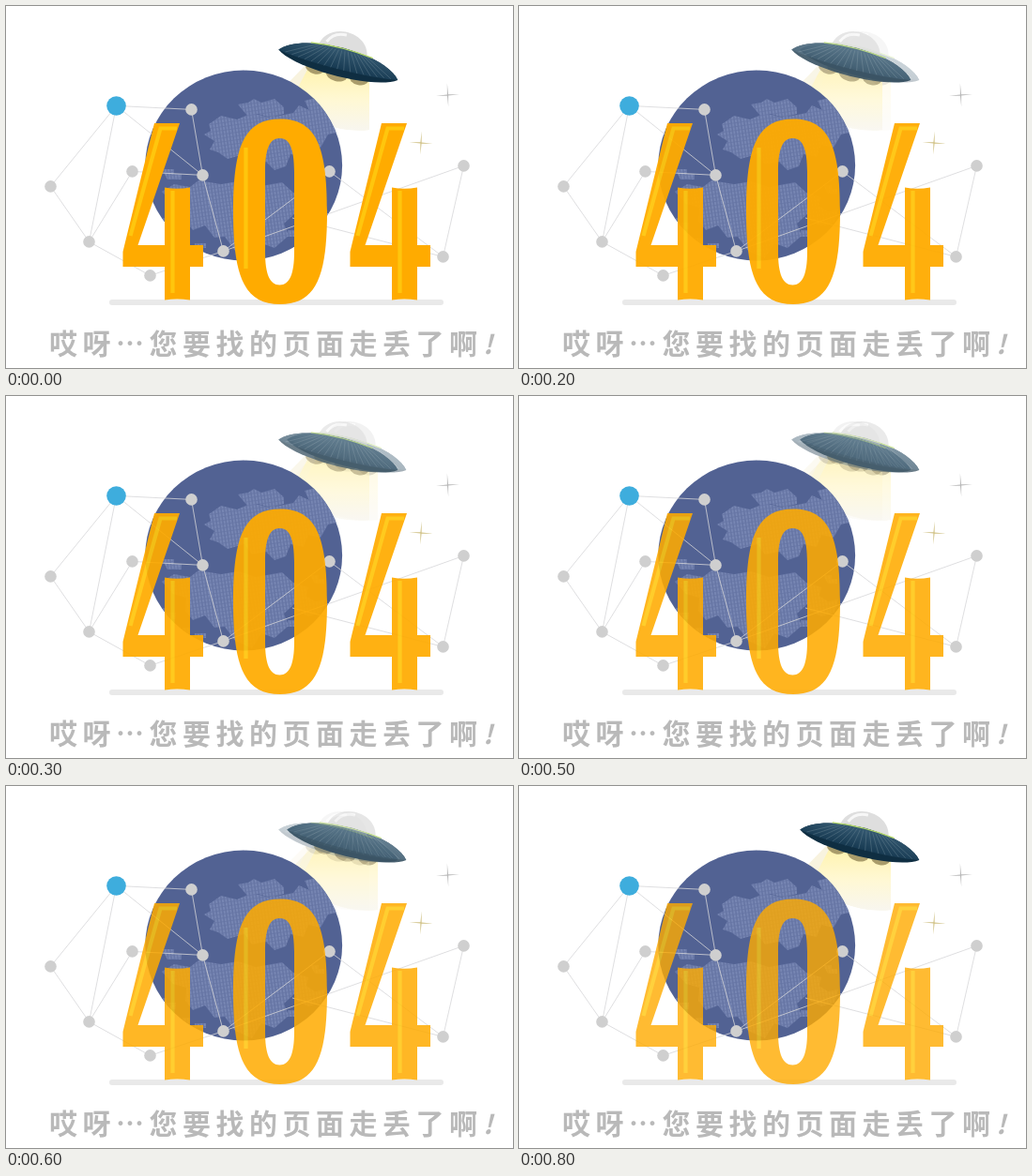
An HTML page that plays this animation: 540x386 px, repeating every 900 ms.

```html
<!DOCTYPE html>
<html lang="zh">
<head>
<meta charset="utf-8">
<title>404</title>
<style>
  html, body { margin: 0; width: 100%; height: 100%; overflow: hidden; background: #fff; }
  svg { display: block; width: 540px; height: 386px; }
  .message { font: 700 30px "Noto Sans CJK SC", "Noto Sans CJK", sans-serif; letter-spacing: 5.5px; fill: #b9b9b9; }
</style>
</head>
<body>
<svg viewBox="0 0 540 386">
  <defs>
    <linearGradient id="beamFill" x1="0" y1="0" x2="0" y2="1">
      <stop offset="0" stop-color="#fff3ae"/>
      <stop offset=".5" stop-color="#fff8d3"/>
      <stop offset="1" stop-color="#f8f6ef"/>
    </linearGradient>
    <linearGradient id="hullFill" x1="0" y1="0" x2="0" y2="1">
      <stop offset="0" stop-color="#365a72"/>
      <stop offset="1" stop-color="#173a52"/>
    </linearGradient>
    <pattern id="hatch" width="3.4" height="4" patternUnits="userSpaceOnUse" patternTransform="rotate(-8)">
      <rect width="3.4" height="4" fill="#6675a4"/>
      <rect width="1.9" height="3.2" fill="#7786b3"/>
    </pattern>
    <clipPath id="globeClip"><ellipse cx="253.2" cy="170" rx="104.9" ry="101.4"/></clipPath>

    <g id="ship">
      <path d="M318 64L288 95Q337 137 387 132V80Z" fill="#f8f3df"/>
      <path d="M322 66L304 100Q337 137 387 132V80Z" fill="url(#beamFill)"/>
      <g transform="translate(353.800 62.800) rotate(14.300)">
        <path d="M-26 -13C-24 -44 26 -44 28 -13Z" fill="#dedede"/>
        <path d="M-18 -21Q-13 -33 1 -33" fill="none" stroke="#f7f7f7" stroke-width="3"/>
        <g fill="#a99c6b">
          <ellipse cx="-23" cy="8.500" rx="10.500" ry="7"/>
          <ellipse cx="1" cy="10.500" rx="11.500" ry="7"/>
          <ellipse cx="25" cy="8.500" rx="10.500" ry="7"/>
        </g>
        <path d="M-65.5 0C-46 -25 46 -25 65.500 0C44 16 -44 16 -65.500 0Z" fill="#0f2e42"/>
        <path d="M-65.5 0C-46 -25 46 -25 65.500 0C38 6 -38 6 -65.500 0Z" fill="url(#hullFill)"/>
        <g id="ribs" stroke="#6d8796" stroke-width=".6" opacity=".65"></g>
        <path d="M-34 -16Q0 -20.500 34 -16" fill="none" stroke="#b4d86a" stroke-width="1.300"/>
      </g>
    </g>

    <g id="four">
      <path d="M158 125H185L140.500 255H169V193.500Q182 196 196 193.500V255H210V278H196V313.500Q182 311.500 169 313.500V278H124.500V262Z" fill="#ffab00"/>
      <path d="M182 130.500H164.500L132.500 245M177.500 197V306" fill="none" stroke="#ffc60d" stroke-width="4.200"/>
    </g>

    <path id="sparkle" d="M0 -12.500L.6 -.6L12.500 0L.6 .6L0 12.500L-.6 .6L-12.500 0L-.6 -.6Z"/>
  </defs>

  <use id="shipRight" href="#ship" x="9"/>
  <use id="shipLeft" href="#ship"/>

  <g clip-path="url(#globeClip)">
    <rect x="148" y="68" width="212" height="204" fill="#526293"/>
    <g fill="url(#hatch)">
      <path d="M247 105L258 103L264 99L272 103L286 99L296 108V115L282 119L268 115L258 118Z"/>
      <path d="M211 137L218 133L216 126L229 117L246 121L262 114L281 119L306 114L312 106L323 111L318 101L333 97L350 113L360 133L343 137L335 151L322 148L317 161L303 158L298 171L286 175L277 166L262 169L254 158L236 163L226 156L217 153L222 144Z"/>
      <path d="M166 198L179 190L196 193L205 186L229 190L247 187L266 193L294 188L306 199L322 204L319 216L309 220L296 232L301 245L286 258L272 253L262 269L244 261L233 246L222 247L212 234L199 239L191 229L192 215L178 211Z"/>
      <path d="M306 216L318 212L329 219L340 217L336 231L322 235L310 229Z"/>
      <path d="M163 226h8v5h10v7h-7v6h-8v-9h-5zM188 247h8v6h-8zM201 253h12v5h-12zM324 191h9v4h6v5h-10zM300 239h8v7h-8zM166 174h13v5h8v6h-15z"/>
    </g>
  </g>

  <g id="links" stroke="#d6d6d8" stroke-width=".8"></g>
  <g id="nodes" fill="#cfcfcf"></g>
  <circle cx="117.500" cy="106.500" r="10.300" fill="#3eaddd"/>
  <use href="#sparkle" x="470.500" y="95" fill="#b9b9b9" transform="rotate(-3 470.500 95)"/>
  <use href="#sparkle" x="442" y="146" fill="#cfc083" transform="rotate(3 442 146)"/>
  <rect x="110" y="313" width="356" height="6" rx="3" fill="#e9e9e9"/>

  <g id="digits">
    <use href="#four"/>
    <path fill="#ffab00" fill-rule="evenodd" d="M242 219C242 151 253 120.500 292 120.500S342 151 342 219S331 318 292 318S242 287 242 219ZM276 219V262C276 286 281 297.500 291.500 297.500S307 286 307 262V177C307 152 302 141 291.500 141S276 152 276 177Z"/>
    <path d="M255.500 151V280" stroke="#ffc60d" stroke-width="4.200"/>
    <use href="#four" x="242"/>
  </g>

  <text class="message" x="46" y="371">哎呀…您要找的页面走丢了啊<tspan x="508" font-size="28" font-style="italic">!</tspan></text>
</svg>

<script>
const byId = id => document.getElementById(id);

function add(parent, tag, attributes) {
  const element = document.createElementNS("http://www.w3.org/2000/svg", tag);
  for (const name in attributes) element.setAttribute(name, attributes[name]);
  byId(parent).append(element);
}

function addLine([x1, y1], [x2, y2], parent = "links") {
  add(parent, "line", { x1, y1, x2, y2 });
}

// The first point is the large blue node; the others are grey.
const points = [
  [117, 106], [197, 110], [134, 176], [47, 192], [88, 251], [153, 287],
  [231, 261], [209, 180], [344, 176], [487, 170], [465, 267]
].map(([x, y]) => [x + 0.5, y + 0.4]);
const pairs = [
  [0, 1], [0, 7], [0, 3], [0, 4], [3, 4], [4, 2], [4, 5], [2, 7], [1, 7],
  [7, 6], [5, 6], [6, 8], [6, 9], [8, 10], [9, 10]
];
for (const [from, to] of pairs) addLine(points[from], points[to]);
addLine([305, 226], points[10]);
for (const [cx, cy] of points.slice(1)) add("nodes", "circle", { cx, cy, r: 6.3 });

for (let i = -8; i <= 8; i++) {
  const u = i / 8;
  addLine([u * 27, -16], [u * 58, 4.5 - 4 * u * u], "ribs");
}

const STEP = 100, STEPS = 9;

function draw(now) {
  const mix = Math.floor(now / STEP) % STEPS / (STEPS - 1);
  byId("shipLeft").setAttribute("opacity", 1 - mix);
  byId("shipRight").setAttribute("opacity", mix);
  byId("digits").setAttribute("opacity", 1 - 0.2 * mix);
}

const start = performance.now();
function tick() {
  draw(performance.now() - start);
  requestAnimationFrame(tick);
}
tick();
</script>
</body>
</html>
```
